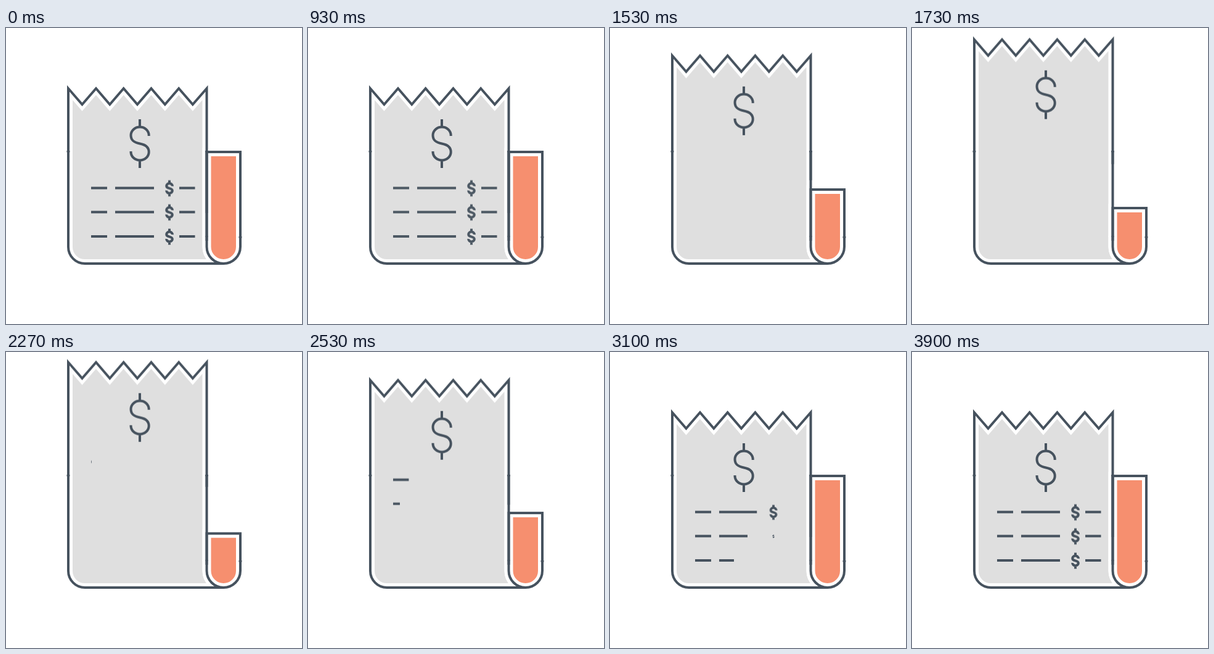
These frames come from a looping animation (480x480 px, 4.51 s). An HTML page:

```html
<!DOCTYPE html>
<html lang="en">
<head>
<meta charset="utf-8">
<title>Receipt</title>
<style>
  html, body { margin: 0; width: 100%; height: 100%; overflow: hidden; background: #fff; }
  svg { display: block; width: 100%; height: 100%; }

  .paper { fill: #dfdfdf; stroke: #fff; stroke-width: 14; }
  .back { fill: #f68f6f; stroke: #fff; stroke-width: 14; }
  .ink { fill: none; stroke: #46525e; stroke-width: 4; }
  .seam { stroke-width: 5; }

  .sheet, .roll, .rows, .row > * { animation: 4510ms linear infinite; }
  .sheet { animation-name: lift; }
  .roll { animation-name: drop; }
  .rows { animation-name: fade; }

  /* each row runs 150 ms behind the one above it */
  .row > * { animation-delay: var(--lag, 0ms); }
  .row:nth-child(2) { --lag: -4360ms; }
  .row:nth-child(3) { --lag: -4210ms; }
  .row > .item { animation-name: item; transform-origin: 138px 0; }
  .row > .name { animation-name: name; transform-origin: 177px 0; }
  .row > .coin { animation-name: coin; transform-origin: 265px .5px; }
  .row > .sum { animation-name: sum; transform-origin: 281px 0; }

  @keyframes lift {
    0%, 23.66% { transform: none; animation-timing-function: cubic-bezier(.4, .05, .72, 1); }
    39.91%, 49.51% { transform: translateY(-82px); animation-timing-function: cubic-bezier(.33, 0, .67, 1); }
    65.79%, 100% { transform: none; }
  }
  @keyframes drop {
    0%, 23.66% { transform: none; animation-timing-function: cubic-bezier(.4, .05, .72, 1); }
    39.91%, 49.51% { transform: translateY(94px); animation-timing-function: cubic-bezier(.33, 0, .67, 1); }
    65.79%, 100% { transform: none; }
  }
  @keyframes fade {
    0%, 19.22% { opacity: 1; animation-timing-function: cubic-bezier(.33, 0, .67, 1); }
    30.31%, 44% { opacity: 0; }
    44.01%, 100% { opacity: 1; }
  }
  @keyframes item {
    0%, 32.15% { transform: scaleX(1); }
    32.16%, 49.67% { transform: scaleX(0); animation-timing-function: cubic-bezier(.33, 0, .67, 1); }
    56.76%, 100% { transform: scaleX(1); }
  }
  @keyframes name {
    0%, 32.15% { transform: scaleX(1); }
    32.16%, 56.39% { transform: scaleX(0); animation-timing-function: cubic-bezier(.33, 0, .67, 1); }
    70.13%, 100% { transform: scaleX(1); }
  }
  @keyframes coin {
    0%, 32.15% { transform: scale(1); }
    32.16%, 63.41% { transform: scale(0); animation-timing-function: cubic-bezier(.33, 0, .67, 1); }
    69.84%, 100% { transform: scale(1); }
  }
  @keyframes sum {
    0%, 32.15% { transform: scaleX(1); }
    32.16%, 72.73% { transform: scaleX(0); animation-timing-function: cubic-bezier(.33, 0, .67, 1); }
    79.82%, 100% { transform: scaleX(1); }
  }
</style>
</head>
<body>
<svg viewBox="0 0 480 480">
  <defs>
    <path id="torn" d="M101 300V98L123.5 124 146 98 168.3 124 190.7 98 213 124 235.5 98 257.8 124 280.2 98 302.8 124 325.5 98V300"/>
    <path id="base" d="M101 200V355A27 27 0 0 0 128 382H352.75"/>
    <path id="rollTop" d="M325.5 345V201H380V345"/>
    <path id="rollEnd" d="M325.5 337V354.75A27.25 27.25 0 0 0 380 354.75V337"/>
    <path id="dollar" d="M269.8 -3A4.8 4.2 0 0 0 260.2 -3.5C260.2 -.5 263 0 265 .5C267 1 269.8 1.5 269.8 4.5A4.8 4.2 0 0 1 260.2 4M265 -12.5V-7.5M265 8.5V13.5"/>
    <clipPath id="aboveEnd"><path d="M0 0H480V339H0Z"/></clipPath>
  </defs>

  <!-- fills with their white margins -->
  <path class="paper" d="M101 200V355A27 27 0 0 0 128 382H352.75A27.25 27.25 0 0 1 325.5 354.75V200"/>
  <use class="paper sheet" href="#torn"/>
  <use class="back" href="#rollEnd"/>
  <g clip-path="url(#aboveEnd)"><use class="back roll" href="#rollTop"/></g>

  <!-- outlines -->
  <g class="ink">
    <use href="#base"/>
    <path d="M325.5 200V345"/>
    <use href="#rollEnd"/>
    <g clip-path="url(#aboveEnd)"><use class="roll" href="#rollTop"/></g>
    <path class="seam" d="M101 199v2.5M325.5 199v2.5M380 338v2.5"/>

    <g class="sheet">
      <use href="#torn"/>
      <path d="M231.7 175V174A14.6 13.5 0 0 0 202.5 174C202.5 183 209 186 217 187.5C225 189 231.7 192 231.7 201A14.6 13.5 0 0 1 202.5 201V200M217 148V160.5M217 214.5V227"/>
      <g class="rows">
        <g class="row" transform="translate(0 259.5)">
          <path class="item" d="M138 0H164"/>
          <path class="name" d="M177 0H240"/>
          <use class="coin" href="#dollar"/>
          <path class="sum" d="M281 0H306.5"/>
        </g>
        <g class="row" transform="translate(0 298.5)">
          <path class="item" d="M138 0H164"/>
          <path class="name" d="M177 0H240"/>
          <use class="coin" href="#dollar"/>
          <path class="sum" d="M281 0H306.5"/>
        </g>
        <g class="row" transform="translate(0 338)">
          <path class="item" d="M138 0H164"/>
          <path class="name" d="M177 0H240"/>
          <use class="coin" href="#dollar"/>
          <path class="sum" d="M281 0H306.5"/>
        </g>
      </g>
    </g>
  </g>
</svg>
</body>
</html>
```
